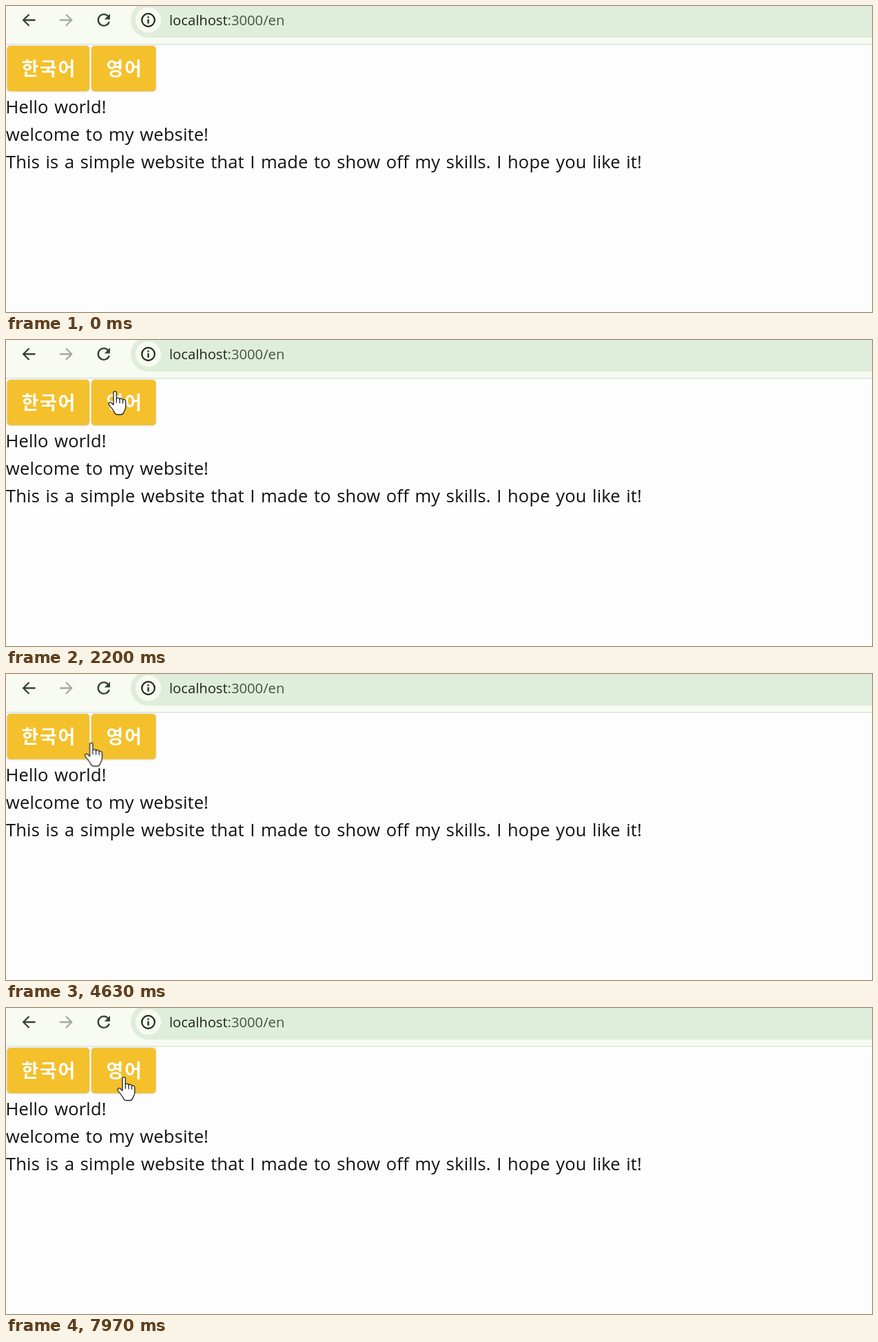
These frames come from a looping animation (1257 by 445 pixels, 8000 ms). An HTML page:

```html
<!DOCTYPE html>
<html lang="ko">
<head>
<meta charset="utf-8">
<title>Language switch</title>
<style>
  html, body { margin: 0; width: 100%; height: 100%; overflow: hidden; background: #fdfdfd; }
  svg { display: block; }
  text { white-space: pre; }

  .url { font: 20.2px "Open Sans", "Noto Sans", sans-serif; fill: #46523f; }
  .host { fill: #20261e; }
  .latin { font: 25.5px "Open Sans", "Noto Sans", sans-serif; letter-spacing: .15px; word-spacing: 1.75px; fill: #111; }
  .key { font-size: 24.9px; letter-spacing: 0; }
  .hangul { font: 27.4px "Noto Sans CJK KR", "Noto Sans CJK", sans-serif; letter-spacing: 1.35px; fill: #111; }
  .label { font: 700 27px "Noto Sans CJK KR", "Noto Sans CJK", sans-serif; letter-spacing: 1.7px; fill: #fff; }
  .button { fill: #f4c02b; }
  .shadow { fill: #e6e6e8; }
  .icon { fill: none; stroke: #34432f; stroke-width: 2.3; }

  .en, .ko, .beam, .arrow, .hand { animation: 8s step-end infinite; }
  .en { animation-name: english; }
  .ko { animation-name: korean; }
  .beam { animation-name: beam; }
  .arrow { animation-name: arrow; }
  .hand { animation-name: hand; }
  .cursor { animation: travel 8s ease-in-out infinite; }

  @keyframes english {
    0%, 51.25%, 91% { visibility: visible; }
    37%, 61.25% { visibility: hidden; }
  }
  @keyframes korean {
    0%, 51.25%, 91% { visibility: hidden; }
    37%, 61.25% { visibility: visible; }
  }
  @keyframes beam {
    0%, 12.4% { visibility: hidden; }
    10.5% { visibility: visible; }
  }
  @keyframes arrow {
    0%, 15.4% { visibility: hidden; }
    12.4% { visibility: visible; }
  }
  @keyframes hand {
    0% { visibility: hidden; }
    15.4% { visibility: visible; }
  }
  @keyframes travel {
    0%, 10.4% { transform: translate(800px, -40px); animation-timing-function: linear; }
    11.2% { transform: translate(736px, 38px); }
    11.5% { transform: translate(736px, 38px); animation-timing-function: ease-out; }
    17%, 24.6% { transform: translate(174px, 72px); }
    27.5% { transform: translate(158px, 74px); }
    33%, 41% { transform: translate(88px, 90px); }
    45.5%, 53.5% { transform: translate(174px, 100px); }
    59%, 77% { transform: translate(119px, 99.5px); }
    84%, 100% { transform: translate(171px, 100px); }
  }
</style>
</head>
<body>
<svg width="1257" height="445" viewBox="0 0 1257 445">
  <rect width="1257" height="445" fill="#fdfdfd"/>

  <!-- toolbar -->
  <rect width="1257" height="55" fill="#f7fbf2"/>
  <rect y="55" width="1257" height="1.6" fill="#dbe6da"/>
  <rect x="181" y="-5" width="1120" height="51" rx="25.5" fill="#dfeddb"/>
  <circle cx="206.5" cy="20.5" r="18.5" fill="#f7fbf2"/>
  <path class="icon" d="M42.5 20.5H25.5M33.5 12.2L25.2 20.5L33.5 28.8"/>
  <path class="icon" style="stroke:#a5aaa1" d="M78 20.5H95M87 12.2L95.3 20.5L87 28.8"/>
  <path class="icon" d="M148.6 15.6A8.2 8.2 0 1 0 149.8 22.8"/>
  <path d="M151 11.3V19.5H142.8Z" fill="#34432f"/>
  <circle cx="206.5" cy="20.5" r="9.3" fill="none" stroke="#1d261a" stroke-width="2.2"/>
  <path d="M206.5 19.3V25.5M206.5 15.2V17.5" stroke="#1d261a" stroke-width="2.3"/>
  <text class="url en" x="237" y="28"><tspan class="host">localhost</tspan>:3000/en</text>
  <text class="url ko" x="237" y="28"><tspan class="host">localhost</tspan>:3000/ko</text>

  <!-- language buttons -->
  <rect class="shadow" x="0.5" y="57" width="121.5" height="68.5" rx="5.5"/>
  <rect class="button" x="1.5" y="58" width="119.5" height="66" rx="5"/>
  <rect class="shadow" x="123" y="57" width="95.5" height="68.5" rx="5.5"/>
  <rect class="button" x="124" y="58" width="93.5" height="66" rx="5"/>
  <text class="label" x="22.5" y="101">한국어</text>
  <text class="label" x="145.5" y="101">영어</text>

  <!-- page text -->
  <g class="latin en">
    <text x="-0.5" y="156">Hello world!</text>
    <text x="0" y="196">welcome to my website!</text>
    <text x="0" y="236">This is a simple website that I made to show off my skills. I hope you like it!</text>
  </g>
  <g class="ko">
    <text class="hangul" x="0" y="155.5">헬로 월드!</text>
    <text class="hangul" x="0" y="195.5">방문한것을 환영한다!</text>
    <text class="latin key" x="-1" y="236">main.summary</text>
  </g>

  <!-- pointer, origin at its hot spot -->
  <g class="cursor">
    <path class="beam" fill="none" stroke="#111" stroke-width="2.5"
      d="M-7 -11.5H-3Q0 -11.5 0 -8.5Q0 -11.5 3 -11.5H7M0 -9V10M-7 12.5H-3Q0 12.5 0 9.5Q0 12.5 3 12.5H7"/>
    <path class="arrow" fill="#fff" stroke="#111" stroke-width="1.3" d="M0 0V25L5.8 19.5L9.8 28.5L13.8 26.7L9.9 18H18Z"/>
    <g class="hand" stroke="#222" stroke-width="1.3" stroke-linejoin="round" stroke-linecap="round">
      <path fill="#fff" d="M-2 2.5C-2 0 2.3 0 2.3 2.5V11.5C2.5 9.5 6.8 9.5 7 12C7.5 10.5 11.3 10.6 11.5 13.2C12.5 12 15.8 12.5 15.8 15.5V23C15.8 27 13.5 29 13 31Q12 34.5 8 34.5H4.5Q0.5 34.5 -0.8 31C-2 27.8 -6 24 -8.3 20.5C-10.5 17.3 -7 15.5 -4.8 17.5L-2 20.3Z"/>
      <path fill="none" d="M2.3 11.5V17M7 12V17.5M11.5 13.2V18"/>
    </g>
  </g>
</svg>
</body>
</html>
```
